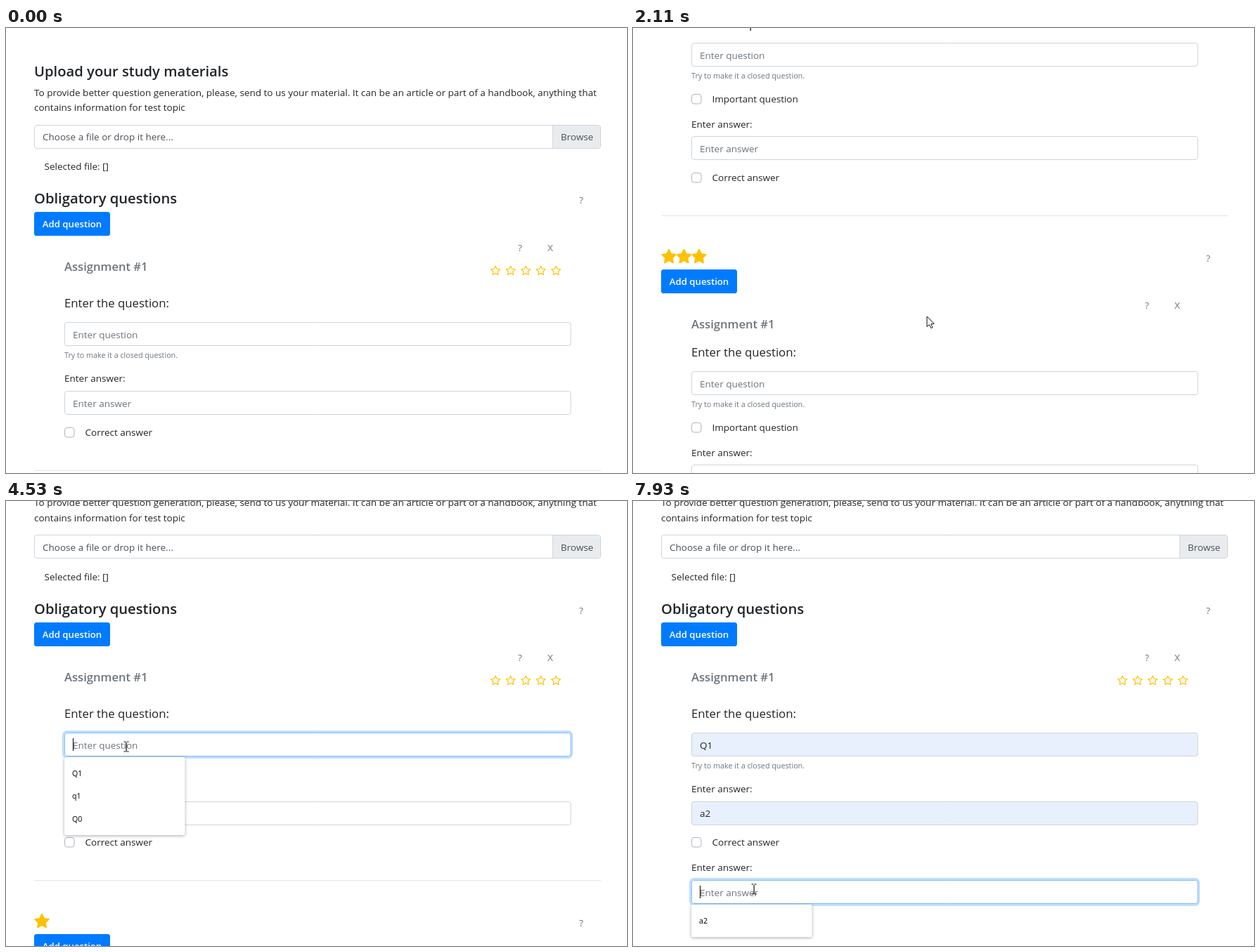
Write an HTML page with a canvas that moves like this. It is 883 px wide and 634 px high and loops after 8 s.

```html
<!DOCTYPE html>
<html lang="en">
<head>
<meta charset="utf-8">
<title>Question form</title>
<style>
html, body { margin: 0; width: 100%; height: 100%; overflow: hidden; background: #fff; }
canvas { display: block; width: 883px; height: 634px; }
</style>
</head>
<body>
<canvas id="stage" width="883" height="634"></canvas>
<script>
const ctx = document.getElementById('stage').getContext('2d');
const LOOP = 8000, INK = '#212529', GREY = '#6c757d', LINE = '#ced4da', GOLD = '#ffc107';
const LEFT = 40, RIGHT = 846, FORM = 83, FORM_W = 720;
const BODY = 13.5, ANSWER_ROW = 112.6, ITEM = 32.3;

// start, end, from, to
const scrolls = [
  [70, 650, 0, 537], [740, 1044, 537, 716], [1290, 2270, 716, 1343],
  [2390, 3010, 1343, 358], [3200, 3518, 358, 89.5]
];
// time, x, y
const pointer = [
  [1330, 421, 410], [2110, 418, 411], [2450, 418, 411], [3010, 419, 420], [3450, 419, 420],
  [4040, 144, 341], [4110, 144, 341], [4180, 171, 350], [5180, 171, 350], [5340, 178, 388],
  [5640, 180, 390], [5940, 172, 446], [6280, 172, 448], [6600, 181, 482], [7050, 181, 482],
  [7350, 145, 468], [7590, 113, 442], [7630, 113, 442], [7680, 171, 550], [7800, 172, 553]
];
const clicks = [[4370, 4490], [5560, 5700], [5990, 6140], [6840, 7030], [7770, 7900]];
const menus = [
  { from: 4450, to: 5620, field: 0, items: ['Q1', 'q1', 'Q0'] },
  { from: 6120, to: 7030, field: 1, items: ['a2', 'a1'] },
  { from: 7900, to: 8001, field: 2, items: ['a2'] }
];
const focusTimes = [4400, 6050, 7830];
const fillTimes = [5290, 6500, Infinity];
const fillTexts = ['Q1', 'a2', ''];

let scroll = 0, inputs = [];

const smooth = u => u * u * (3 - 2 * u);
const clamp = u => Math.max(0, Math.min(1, u));
const snap = y => Math.round(y - scroll);

function scrollAt(t) {
  let y = 0;
  for (const [a, b, from, to] of scrolls) if (t >= a) y = from + (to - from) * smooth(clamp((t - a) / (b - a)));
  return y;
}

function pointerAt(t) {
  const i = pointer.findIndex(k => k[0] > t);
  if (i === 0) return pointer[0].slice(1);
  if (i < 0) return pointer[pointer.length - 1].slice(1);
  const [t0, x0, y0] = pointer[i - 1], [t1, x1, y1] = pointer[i];
  const u = smooth((t - t0) / (t1 - t0));
  return [x0 + (x1 - x0) * u, y0 + (y1 - y0) * u];
}

function text(str, x, y, { size = BODY, weight = 400, color = INK, align = 'left' } = {}) {
  ctx.font = `${weight} ${size}px "Open Sans", "Noto Sans", sans-serif`;
  ctx.fillStyle = color;
  ctx.textAlign = align;
  ctx.fillText(str, x, snap(y));
}

function box(x, y, w, h, r, fill, stroke, lineWidth = 1) {
  ctx.beginPath();
  ctx.roundRect(x, y, w, h, r);
  if (fill) { ctx.fillStyle = fill; ctx.fill(); }
  if (stroke) { ctx.strokeStyle = stroke; ctx.lineWidth = lineWidth; ctx.stroke(); }
}

function star(x, y, r, filled) {
  ctx.beginPath();
  for (let i = 0; i < 10; i++) {
    const a = i * Math.PI / 5, d = i % 2 ? r * 0.5 : r;
    ctx.lineTo(x + d * Math.sin(a), snap(y) - d * Math.cos(a));
  }
  ctx.closePath();
  ctx.lineJoin = 'round';
  ctx.strokeStyle = ctx.fillStyle = GOLD;
  ctx.lineWidth = filled ? 1.8 : 1.2;
  if (filled) ctx.fill();
  ctx.stroke();
}

function button(y) {
  box(LEFT, snap(y), 108, 34, 3.6, '#007bff');
  text('Add question', LEFT + 54, y + 22, { size: 13.2, weight: 600, color: '#fff', align: 'center' });
}

function checkbox(y, label) {
  box(FORM + .5, snap(y) - 6.5, 13.5, 13.5, 3.4, '#fff', '#adb5bd');
  text(label, 112.5, y + 5);
}

function input(y, hint, { value = '', focusedFor = -1 } = {}) {
  const top = snap(y);
  inputs.push(top);
  const focused = focusedFor >= 0;
  if (focused) box(FORM - 1.5, top - 1.5, FORM_W + 3, 37, 5, null, 'rgba(0,123,255,.25)', 3);
  box(FORM + .5, top + .5, FORM_W - .5, 33, 3.4, value ? '#e8f0fe' : '#fff', focused ? '#80bdff' : LINE);
  text(value || hint, FORM + 12, y + 22.6, { color: value ? INK : GREY });
  if (focused && !value && focusedFor % 980 < 490) {
    ctx.fillStyle = '#000';
    ctx.fillRect(FORM + 12, top + 8, 1, 18);
  }
}

function fieldState(t, i) {
  const next = focusTimes[i + 1] || Infinity;
  return {
    value: t >= fillTimes[i] ? fillTexts[i] : '',
    focusedFor: t >= focusTimes[i] && t < next ? t - focusTimes[i] : -1
  };
}

function divider(y) {
  ctx.fillStyle = 'rgba(0,0,0,.1)';
  ctx.fillRect(LEFT, snap(y), RIGHT - LEFT, 1);
}

// y is the top of the section's button; returns that of the next section
function section(y, stars, t) {
  const main = stars === 0, mark = { color: GREY, align: 'center' };
  const state = i => main ? fieldState(t, i) : {};
  if (main) text('Obligatory questions', LEFT, y - 12, { size: 20.2, weight: 600 });
  for (let i = 0; i < stars; i++) star(51 + i * 21.5, y - 18.2, 10.4, true);
  text('?', 818, y - 12 + (main ? 0 : 1), mark);
  button(y);
  text('?', 731, y + 55.6, mark);
  text('X', 774, y + 55.6, mark);
  text('Assignment #1', FORM, y + 84, { size: 16.6, weight: 600, color: GREY });
  if (main) for (let i = 0; i < 5; i++) star(696 + i * 21.5, y + 83.5, 6.8, false);

  let g = main ? y : y - 12.3;
  text('Enter the question:', FORM, g + 135.8, { size: 16.75 });
  input(g + 157.1, 'Enter question', state(0));
  text('Try to make it a closed question.', FORM, g + 207.9, { size: 10.75, color: GREY });
  if (!main) {
    checkbox(g + 237.3, 'Important question');
    g += 35.8;
  }
  const rows = main && t >= 7100 ? 2 : 1;
  for (let i = 0; i < rows; i++) {
    const top = g + i * ANSWER_ROW;
    text('Enter answer:', FORM, top + 242);
    input(top + 254.7, 'Enter answer', state(i + 1));
    checkbox(top + 313.6, 'Correct answer');
  }
  g += (rows - 1) * ANSWER_ROW;
  divider(g + 367.6);
  return g + 444.6;
}

function upload() {
  text('Upload your study materials', LEFT, 68.6, { size: 20.2, weight: 600 });
  text('To provide better question generation, please, send to us your material. It can be an article or part of a handbook, anything that', LEFT, 96.9);
  text('contains information for test topic', LEFT, 118.3);
  const top = snap(137.9);
  box(LEFT + .5, top + .5, RIGHT - LEFT - 1, 33, 3.4, '#fff', LINE);
  box(778, top + 1, RIGHT - 779, 32, [0, 3, 3, 0], '#e9ecef');
  ctx.fillStyle = LINE;
  ctx.fillRect(777, top, 1, 34);
  text('Choose a file or drop it here...', 52, 160.4, { color: '#495057' });
  text('Browse', 812, 160.4, { color: '#495057', align: 'center' });
  text('Selected file: []', 54.5, 202.3);
}

function drawMenu({ field, items }, [px, py]) {
  const top = inputs[field] + 35, h = 14 + ITEM * items.length;
  ctx.save();
  ctx.shadowColor = 'rgba(0,0,0,.35)';
  ctx.shadowBlur = 4;
  ctx.shadowOffsetY = 1;
  box(FORM, top, 171.5, h, 2, '#fff');
  ctx.restore();
  items.forEach((item, i) => {
    const y = top + 7 + i * ITEM;
    if (py >= y && py < y + ITEM && px > FORM) {
      ctx.fillStyle = '#e7e8e9';
      ctx.fillRect(FORM, Math.round(y), 171.5, 32);
    }
    text(item, 94, y + 20 + scroll, { size: 10.6, color: '#000' });
  });
  return top;
}

function arrow(x, y) {
  const shape = [[0, 0], [0, 14.6], [3.4, 11.5], [5.7, 16.6], [8, 15.6], [5.8, 10.7], [10.2, 10.3]];
  ctx.beginPath();
  shape.forEach(([dx, dy]) => ctx.lineTo(x + dx, y + dy));
  ctx.closePath();
  ctx.lineJoin = 'miter';
  ctx.fillStyle = '#fff';
  ctx.strokeStyle = '#111';
  ctx.lineWidth = 1;
  ctx.fill();
  ctx.stroke();
}

function beam(x, y) {
  ctx.fillStyle = '#111';
  ctx.fillRect(x - .5, y - 6, 1.2, 13);
  for (const dy of [-7, 7]) {
    ctx.fillRect(x - 3.5, y + dy - .5, 3, 1);
    ctx.fillRect(x + .7, y + dy - .5, 3, 1);
  }
}

function drawPointer(t, [x, y], menuTop) {
  // the pointer shape follows the page with a small delay
  const drift = scrollAt(t) - scrollAt(t - 80);
  const overInput = inputs.some(top => y - drift >= top && y - drift <= top + 34);
  const overMenu = menuTop && y >= menuTop;
  if (clicks.some(([a, b]) => t >= a && t < b)) {
    ctx.fillStyle = 'rgba(240,234,70,.75)';
    ctx.beginPath();
    ctx.arc(x, y, 13.3, 0, 7);
    ctx.fill();
  }
  (overInput && !overMenu ? beam : arrow)(x, y);
}

function draw(t) {
  ctx.fillStyle = '#fff';
  ctx.fillRect(0, 0, 883, 634);
  scroll = scrollAt(t);
  inputs = [];
  upload();
  let y = 262.3;
  for (let stars = 0; stars <= 3; stars++) y = section(y, stars, t);
  const pos = pointerAt(t);
  const menu = menus.find(m => t >= m.from && t < m.to);
  const menuTop = menu && drawMenu(menu, pos);
  if (t >= 130) drawPointer(t, pos, menuTop);
}

function tick() {
  draw(performance.now() % LOOP);
  requestAnimationFrame(tick);
}
tick();
</script>
</body>
</html>
```
